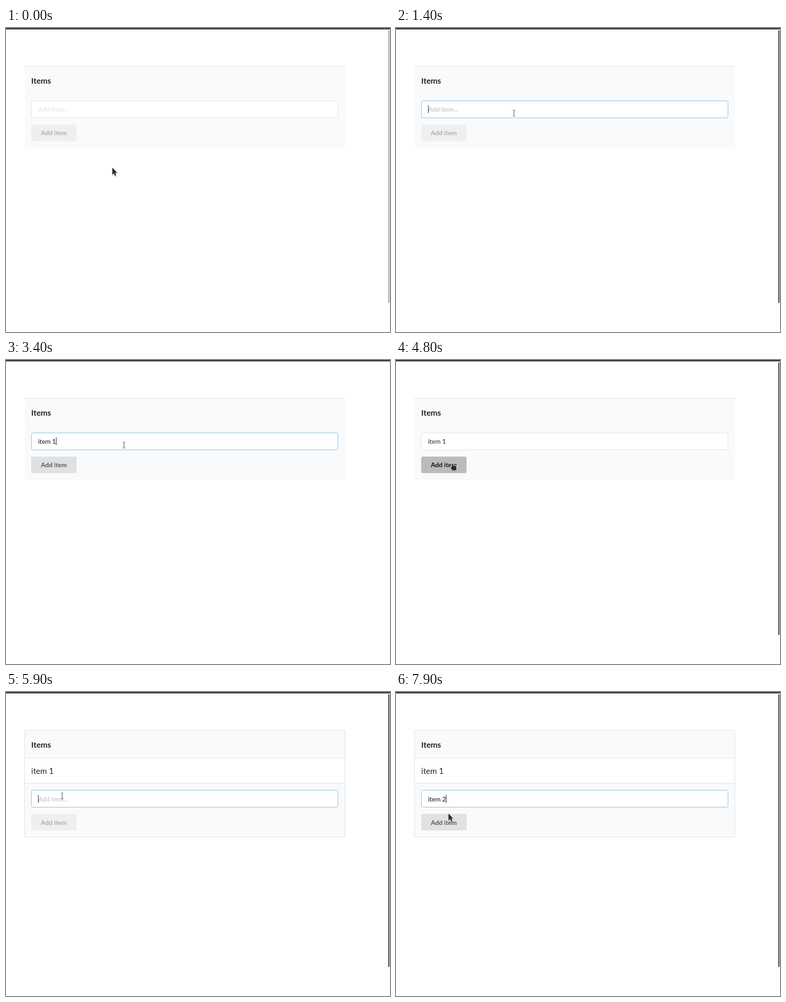
An HTML page for the animation above (8 s loop, 838 px wide and 661 px high).

```html
<!DOCTYPE html>
<html lang="en">
<head>
<meta charset="utf-8">
<title>Item list</title>
<style>
  html, body { margin: 0; width: 100%; height: 100%; overflow: hidden; background: #fff; }
  svg { display: block; width: 838px; height: 661px; }
  text { font: 14px Lato, sans-serif; white-space: pre; }
  .big { font-size: 17.6px; fill: rgba(0,0,0,.87); }
  .bold { font-weight: 700; }
  .line { fill: none; stroke: rgba(34,36,38,.15); }
  .pointer { fill: #2b2b2b; stroke: #fff; stroke-width: 2; stroke-linejoin: round; paint-order: stroke;
    filter: drop-shadow(.5px 1px .7px rgba(0,0,0,.35)); }
  #beam { fill: none; stroke: #333; stroke-width: 1; }
</style>
</head>
<body>
<svg viewBox="0 0 838 661">
  <rect width="838" height="2" fill="#474447"/>
  <rect y="2" width="838" height="1" fill="#2b252a"/>
  <rect id="bar" x="834" y="5" width="3" height="593" rx="1" fill="#606060"/>

  <g id="emptyPanel">
    <path d="M41 84H740V257a4 4 0 0 1 -4 4H45a4 4 0 0 1 -4 -4z" fill="#f9fafb"/>
    <path class="line" d="M40 83.5H740"/>
  </g>
  <g id="listPanel">
    <path d="M41 84H739V143H41zM41 199H739V315H41z" fill="#f9fafb"/>
    <path class="line" d="M40.5 83.5H739.5V315.5H40.5zM41 143.5H739M41 198.5H739"/>
    <text class="big" x="55" y="178">item 1</text>
  </g>
  <text class="big bold" x="55" y="121">Items</text>

  <g id="boxes">
    <rect id="field" x="55.5" y="158.5" width="669" height="37" rx="3" fill="#fff"/>
    <rect id="button" x="55" y="210" width="99" height="36" rx="4"/>
  </g>
  <g id="labels">
    <text id="hint" x="70" y="182">Add item...</text>
    <text id="value" x="70" y="182"></text>
    <rect id="caret" y="168" width="1" height="17"/>
    <text id="caption" class="bold" x="76" y="233">Add item</text>
  </g>

  <g id="arrow" class="pointer">
    <path d="M0 0V15.6L3.5 12.4L6 18L8.6 16.8L6.2 11.3H10.6z"/>
  </g>
  <g id="beam">
    <path d="M-2.5 -6.5H-.7M.7 -6.5H2.5M0 -6V6M-2.5 6.5H-.7M.7 6.5H2.5"/>
  </g>
  <g id="hand" class="pointer">
    <path d="M-1.8 1Q-1.8 -.6 -.3 -.6T1.2 1V4.6Q3 3.6 4 5Q5.8 4.2 6.6 5.7Q8.6 5.4 8.6 7.4V10.4Q8.6 13 7.2 15H-.6L-3.6 10.4Q-5 8.4 -4.2 7.6Q-3.2 6.8 -1.8 8.4z"/>
  </g>
</svg>
<script>
const $ = id => document.getElementById(id);
const LOOP = 8000, STEP = 100;
const FOCUS = 1300, PRESS = 4800, ADDED = 4900, REFOCUS = 5800;

const moves = [
  { from: 400, to: 1000, x: 257.5, y: 185 },
  { from: 3600, to: 4200, x: 123.5, y: 225 },
  { from: 5300, to: 5600, x: 122.5, y: 226 },
  { from: 7800, to: 7900, x: 114.5, y: 264 },
];
const first = { word: 'item ', digit: '1', start: 2100, gap: 200, end: 3400 };
const second = { word: 'item ', digit: '2', start: 6500, gap: 150, end: 7300 };

const clamp = v => Math.min(1, Math.max(0, v));
const mix = (a, b, p) => `rgb(${a.map((v, i) => Math.round(v + (b[i] - v) * p))})`;
const show = (id, on) => $(id).style.display = on ? '' : 'none';
const set = (id, name, value) => $(id).setAttribute(name, value);

// Short transition, halfway at its first step
const ramp = (t, start) => clamp((t - start) / STEP + .5);

function typed(t, { word, digit, start, gap, end }) {
  if (t >= end) return word + digit;
  return word.slice(0, Math.max(0, Math.floor((t - start) / gap) + 1));
}

function pointerAt(t) {
  let x = 232, y = 303.5;
  for (const m of moves) {
    const p = clamp((t - m.from) / (m.to - m.from)), e = p * p * (3 - 2 * p);
    x += (m.x - x) * e;
    y += (m.y - y) * e;
  }
  return [x, y];
}

// The scrollbar fades once the pointer has rested for about a second
function barAlpha(t) {
  let moved = -1170;
  for (const m of moves) if (t > m.from) moved = Math.min(t, m.to);
  return clamp(1 - (t - moved - 1030) / 270);
}

function draw(t) {
  const listed = t >= ADDED, text = typed(t, listed ? second : first);
  const focus = t < PRESS ? ramp(t, FOCUS) : ramp(t, REFOCUS);
  const enabled = ramp(t, first.start) - ramp(t, ADDED) + ramp(t, second.start);
  const [x, y] = pointerAt(t);

  set('bar', 'opacity', barAlpha(t));
  show('emptyPanel', !listed);
  show('listPanel', listed);
  set('boxes', 'transform', `translate(0 ${listed ? 55 : 0})`);
  set('labels', 'transform', `translate(0 ${listed ? 56 : 0})`);

  set('field', 'stroke', mix([222, 222, 223], [133, 183, 217], focus));
  show('hint', !text);
  set('hint', 'fill', focus ? '#bdbdbd' : '#e1e1e1');
  $('value').textContent = text;
  set('value', 'fill', `rgba(0,0,0,${focus ? .95 : .87})`);
  show('caret', focus);
  set('caret', 'x', Math.round(70 + (text ? $('value').getComputedTextLength() : 0)));

  const over = !listed && x < 154 && y > 210 && y < 246;
  const pressed = t >= PRESS && !listed;
  set('button', 'fill', pressed ? '#babbbc' : over ? '#cacbcd' : '#e0e1e2');
  set('caption', 'fill', `rgba(0,0,0,${pressed ? .9 : over ? .8 : .6})`);
  for (const id of ['button', 'caption']) set(id, 'opacity', .45 + .55 * enabled);

  const top = listed ? 213 : 158, inField = y > top && y < top + 38;
  const resting = listed && t <= moves[2].from;
  const kind = over || resting ? 'hand' : inField ? 'beam' : 'arrow';
  for (const id of ['arrow', 'beam', 'hand']) show(id, id === kind);
  set(kind, 'transform', `translate(${x} ${y})`);
}

function tick() {
  const t = performance.now() % LOOP;
  draw(Math.floor(t / STEP) * STEP);
  requestAnimationFrame(tick);
}
tick();
</script>
</body>
</html>
```
